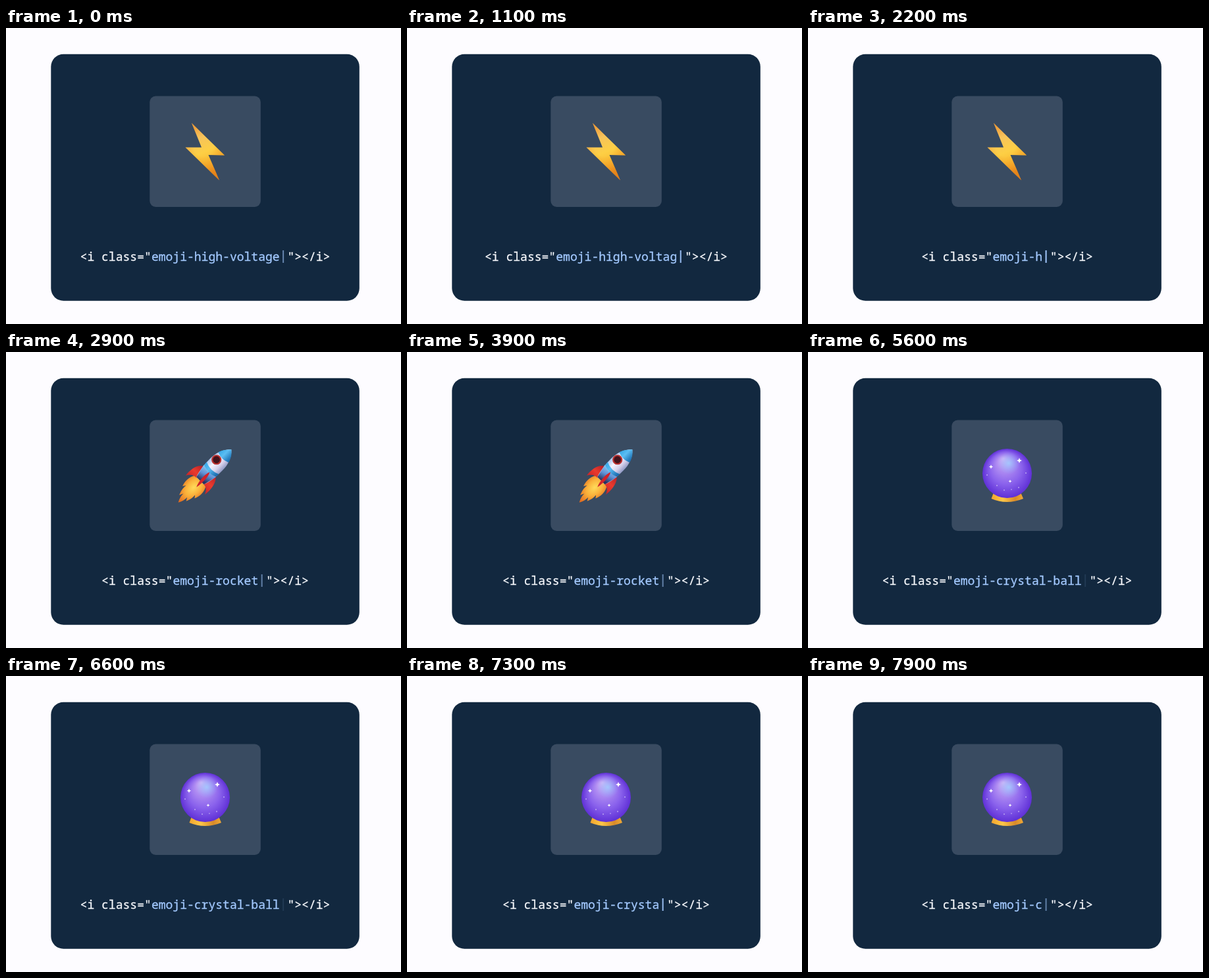
Recreate the animation shown at these times as an HTML page. Size 600 px wide and 450 px high, loop 8000 ms.

```html
<!DOCTYPE html>
<html lang="en">
<head>
<meta charset="utf-8">
<title>Emoji classes</title>
<style>
  html, body { margin: 0; width: 100%; height: 100%; overflow: hidden; background: #fdfcff; }
  svg { display: block; width: 600px; height: 450px; }
  text {
    font: 18.05px "Noto Sans Mono", "DejaVu Sans Mono", monospace;
    fill: #f6f8fc; stroke: #f6f8fc; stroke-width: .3px;
  }
  #name { fill: #a3c9ff; stroke: #a3c9ff; }
  .icon { visibility: hidden; }
</style>
</head>
<body>
<svg viewBox="0 0 600 450">
  <defs>
    <linearGradient id="boltBase" gradientUnits="userSpaceOnUse" x1="284" y1="145" x2="320" y2="231">
      <stop offset="0" stop-color="#f2b456"/>
      <stop offset=".25" stop-color="#f6c35c"/>
      <stop offset=".5" stop-color="#fdcf45"/>
      <stop offset=".75" stop-color="#f8b62f"/>
      <stop offset="1" stop-color="#d67a1c"/>
    </linearGradient>
    <radialGradient id="boltEdge" gradientUnits="userSpaceOnUse" cx="300" cy="180" r="42">
      <stop offset=".35" stop-color="#ee8a1c" stop-opacity="0"/>
      <stop offset="1" stop-color="#e67e16" stop-opacity=".7"/>
    </radialGradient>
    <linearGradient id="hull" x1="0" x2="1">
      <stop offset="0" stop-color="#a9c6ee"/>
      <stop offset=".35" stop-color="#f6f4ff"/>
      <stop offset=".7" stop-color="#d5d0ea"/>
      <stop offset="1" stop-color="#8e98c4"/>
    </linearGradient>
    <linearGradient id="blue" x1="0" x2="1">
      <stop offset="0" stop-color="#36a9e8"/>
      <stop offset=".4" stop-color="#5bbdf2"/>
      <stop offset="1" stop-color="#1467ac"/>
    </linearGradient>
    <linearGradient id="tail" x1="0" y1="0" x2=".4" y2="1">
      <stop offset="0" stop-color="#8fc4f0"/>
      <stop offset=".5" stop-color="#5f92d6"/>
      <stop offset="1" stop-color="#26325f"/>
    </linearGradient>
    <linearGradient id="red" x1="0" y1="0" x2="0" y2="1">
      <stop offset="0" stop-color="#b3202a"/>
      <stop offset=".5" stop-color="#ea3a2c"/>
      <stop offset="1" stop-color="#c4222a"/>
    </linearGradient>
    <radialGradient id="fire" cx=".5" cy=".3" r=".65">
      <stop offset="0" stop-color="#ffdb5a"/>
      <stop offset=".5" stop-color="#fab03a"/>
      <stop offset="1" stop-color="#e06a20"/>
    </radialGradient>
    <radialGradient id="ball" cx=".5" cy=".5" r=".5" fx=".42" fy=".2">
      <stop offset="0" stop-color="#d9b5f5"/>
      <stop offset=".3" stop-color="#b08df2"/>
      <stop offset=".65" stop-color="#8a62ec"/>
      <stop offset="1" stop-color="#5f30d6"/>
    </radialGradient>
    <radialGradient id="sheen">
      <stop offset="0" stop-color="#9fd0ff" stop-opacity=".8"/>
      <stop offset="1" stop-color="#8fb4ff" stop-opacity="0"/>
    </radialGradient>
    <linearGradient id="gold" x1="0" x2="1">
      <stop offset="0" stop-color="#f3a52c"/>
      <stop offset=".35" stop-color="#fdc648"/>
      <stop offset=".75" stop-color="#d88a2a"/>
      <stop offset="1" stop-color="#f0a936"/>
    </linearGradient>
    <path id="bolt" d="M282 144.500L332 193.500L307.500 193L324 231.500L272.500 181.500L297 181.500Z"/>
  </defs>

  <rect width="600" height="450" fill="#fdfcff"/>
  <rect x="68.300" y="39.700" width="468.500" height="375" rx="19" fill="#12283f"/>
  <rect x="218.300" y="103.500" width="168.500" height="168.500" rx="9" fill="#394b61"/>

  <g class="icon">
    <use href="#bolt" fill="url(#boltBase)"/>
    <use href="#bolt" fill="url(#boltEdge)"/>
  </g>

  <g class="icon" transform="translate(302 188.500) rotate(45)">
    <path d="M-11 10C-16 18-16 27-13 35L-10 30C-11 38-9 43-7 48L-4 42C-4 49-2 53 0 57C3 52 4 47 4 42L7 47C10 41 10 36 10 31L13 35C17 27 17 18 12 10Z" fill="url(#fire)"/>
    <path d="M-12-9C-20-5-23 7-21 20C-17 13-13 11-7 11Z" fill="url(#red)"/>
    <path d="M11-12C19-7 22 6 20 20C17 13 13 10 7 10Z" fill="url(#red)"/>
    <path d="M0-57C-9-49-13.500-37-13-24C-13-10-11 1-8 10H8C12 0 13-10 13-24C13.500-38 8-50 0-57Z" fill="url(#hull)"/>
    <path d="M0-57C-5-52-9-47-11-40Q0-35 11-40C9-48 5-53 0-57Z" fill="url(#blue)"/>
    <path d="M-13-11Q0-5 13-11L8 10H-8Z" fill="url(#tail)"/>
    <path d="M-13-17Q0-11 13-17L12.500-11Q0-5-12.500-11Z" fill="url(#blue)"/>
    <circle cx="-5" cy="-30" r="7.600" fill="#b8302f"/>
    <circle cx="-5" cy="-30" r="5.400" fill="#43131c"/>
    <path d="M1-9C5-5 5 13 3 21C-1 13-2-3 1-9Z" fill="#cf232a"/>
  </g>

  <g class="icon">
    <path d="M283 211L278.500 223Q302 233 327 223L322 211Z" fill="url(#gold)"/>
    <circle cx="302.500" cy="184.500" r="37.500" fill="url(#ball)"/>
    <circle cx="305" cy="169" r="17" fill="url(#sheen)"/>
    <g id="stars" fill="#fff"></g>
  </g>

  <text id="open" y="353.500">&lt;i class="</text>
  <text id="name" y="353.500"></text>
  <rect id="cursor" y="338" width="2" height="19" fill="#a3c9ff"/>
  <text id="close" y="353.500">"&gt;&lt;/i&gt;</text>
</svg>
<script>
const LOOP = 8000, TICK = 100;
const CELL = 18.05 * 0.6, CURSOR = 11.6, MIDDLE = 302.5;
const PREFIX = "emoji-";

// Each word: when typing starts, when deleting starts.
const words = [
  { name: "high-voltage", type: -3000, erase: 1050 },
  { name: "rocket", type: 2360, erase: 3950 },
  { name: "crystal-ball", type: 4615, erase: 6700 }
];
const TYPE_STEP = 83, ERASE_STEP = 110;
// Cursor opacity through one second.
const blink = [.58, .92, 1, .92, .7, .35, .1, 0, .15, .55];

const $ = id => document.getElementById(id);
const icons = document.querySelectorAll(".icon");

// Four-pointed sparkles: x, y, radius.
const sparkles = [[321, 165, 4], [278, 174.5, 3.2], [307, 196.5, 2.5], [287, 203, 1.2],
  [272, 187, 1.2], [331, 184, 1.2], [320, 206, 1.2], [298, 210, 1.2], [309, 209, 1]];
$("stars").innerHTML = sparkles.map(([x, y, r]) => {
  const k = r * 0.3;
  return `<path d="M${x} ${y - r}l${k} ${r - k}l${r - k} ${k}l${k - r} ${k}l${-k} ${r - k}` +
    `l${-k} ${k - r}l${k - r} ${-k}l${r - k} ${-k}z"/>`;
}).join("");

const steps = (t, start, step) => t < start ? 0 : 1 + Math.floor((t - start) / step);

function typed(t) {
  const word = words.filter(w => t >= w.type).pop();
  const added = Math.min(word.name.length, steps(t, word.type, TYPE_STEP));
  const removed = steps(t, word.erase, ERASE_STEP);
  return PREFIX + word.name.slice(0, Math.max(0, added - removed));
}

// The icon changes once its word is complete.
function iconAt(t) {
  let shown = 0;
  words.forEach((w, i) => {
    if (t >= w.type + (w.name.length - 1) * TYPE_STEP) shown = i;
  });
  return shown;
}

function draw(time) {
  const t = Math.floor((time % LOOP) / TICK) * TICK;
  const name = typed(t);
  const left = MIDDLE - ((16 + name.length) * CELL + CURSOR) / 2;
  const nameX = left + 10 * CELL;
  const end = nameX + name.length * CELL;

  $("open").setAttribute("x", left);
  $("name").setAttribute("x", nameX);
  $("name").textContent = name;
  $("cursor").setAttribute("x", end + CURSOR / 2 - 1.5);
  $("cursor").setAttribute("opacity", blink[(t / TICK) % 10]);
  $("close").setAttribute("x", end + CURSOR);

  const shown = iconAt(t);
  icons.forEach((icon, i) => icon.style.visibility = i === shown ? "visible" : "hidden");
}

const begin = performance.now();
function frame() {
  draw(performance.now() - begin);
  requestAnimationFrame(frame);
}
frame();
</script>
</body>
</html>
```
